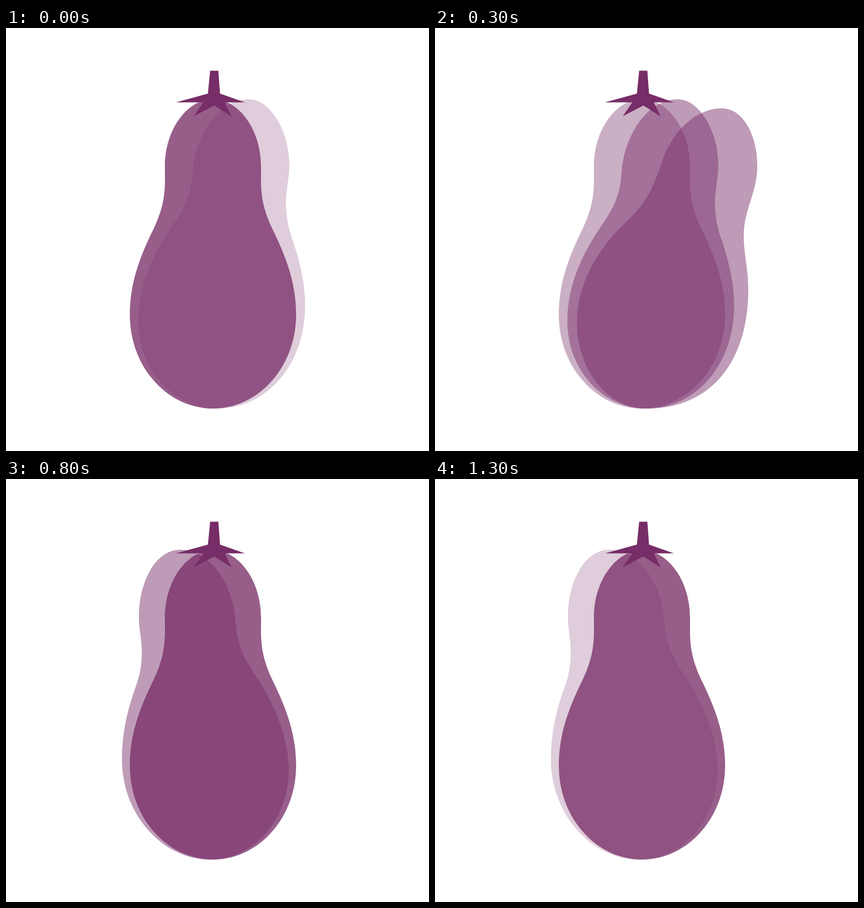
An HTML page for the animation above (1400 ms loop, 748 by 748 pixels).

```html
<!DOCTYPE html>
<html lang="en">
<head>
<meta charset="utf-8">
<title>Swaying aubergine</title>
<style>
  html, body { margin: 0; width: 100%; height: 100%; overflow: hidden; background: #fff; }
  svg { display: block; width: 100%; height: 100%; fill: #772d67; }
</style>
</head>
<body>
<svg viewBox="0 0 748 748">
  <path id="farLeft" d="M241 139C204 139 178 185 178 240C178 292 199 315 199 362C199 398 189 425 189 467C189 585 265 673 361 673C434 673 490 606 490 525C490 455 455 384 410 339C374 304 362 286 349 240C332 182 288 139 241 139Z"/>
  <path id="nearLeft" d="M308 125C265 125 235 181 235 243C235 270 241 283 240 314C239 342 232 360 226 377C213 415 205 452 205 496C205 592 276 673 361 673C437 673 500 603 500 515C500 457 474 399 447 356C424 322 409 298 406 253C402 185 360 125 308 125Z"/>
  <path id="upright" d="M366 126C412 126 451 180 451 245L451 262C450 300 457 325 470 353C492 398 513 446 513 507C513 599 447 673 366 673C285 673 219 599 219 507C219 446 240 398 262 353C275 325 282 300 281 262L281 245C281 180 320 126 366 126Z"/>
  <path id="nearRight" d="M430 126C466 126 501 181 501 241C501 268 495 283 495 313C496 342 502 362 508 378C520 415 529 452 529 491C529 594 462 673 374 673C298 673 234 606 234 518C234 455 261 399 292 353C312 324 328 300 330 253C336 188 376 126 430 126Z"/>
  <path id="farRight" d="M507 142C545 142 570 190 570 243C570 292 546 320 546 368C546 400 554 425 554 462C554 590 488 673 374 673C303 673 251 602 251 520C251 453 288 392 332 349C365 318 380 298 398 247C416 185 460 142 507 142Z"/>
  <path d="M361 75.5H375.5L378.5 116L422.5 131.5H387L399 156.5L368.5 137L332 156L349 131.5H300.5L357 116Z"/>
</svg>
<script>
const STEP = 100;
// Opacity of the upright, near and far shapes over half a swing.
const RISE = [
  [0.765, 0.235, 0],
  [0.765, 0.475, 0],
  [0.38, 0.475, 0.235],
  [0.38, 0.475, 0.475]
];
const SWING = [...RISE, ...RISE.slice(0, -1).reverse()];
const NAMES = ["upright", "nearLeft", "farLeft", "nearRight", "farRight"];
const shapes = NAMES.map(name => document.getElementById(name));

function draw(time) {
  const step = Math.floor(time / STEP) % (SWING.length * 2);
  const [upright, near, far] = SWING[step % SWING.length];
  const alphas = step < SWING.length
    ? [upright, 0, 0, near, far]
    : [upright, near, far, 0, 0];
  shapes.forEach((shape, i) => shape.setAttribute("fill-opacity", alphas[i]));
}

const start = performance.now();
function tick() {
  draw(performance.now() - start);
  requestAnimationFrame(tick);
}
tick();
</script>
</body>
</html>
```
